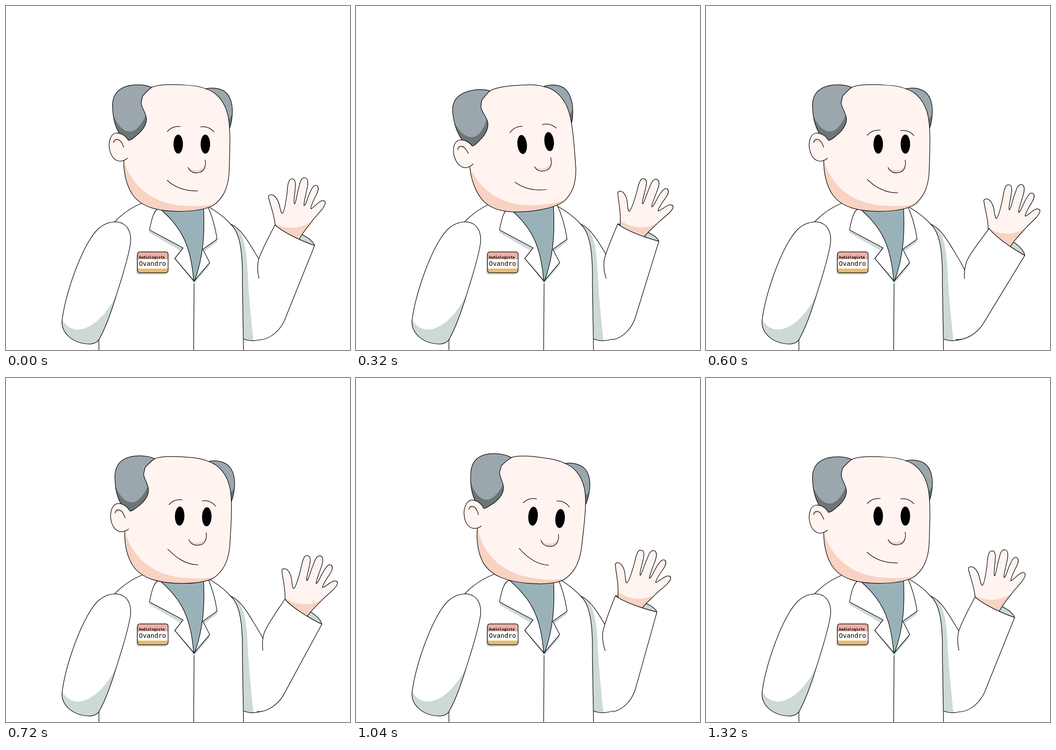
An HTML page that plays this animation: 748 px wide and 748 px high, repeating every 1400 ms.

```html
<!DOCTYPE html>
<html lang="pt">
<head>
<meta charset="utf-8">
<title>Waving audiologist</title>
<style>
  html, body { margin: 0; width: 100%; height: 100%; overflow: hidden; background: #fff; }
  svg { display: block; width: 100vw; height: 100vh; }
  .ln { fill: none; stroke: #000; stroke-width: 1.25; stroke-linecap: round; stroke-linejoin: round; }
  .white { fill: #fff; }
  .shade { fill: #cdd9d6; }
  .skin { fill: #fff4f0; }
  .blush { fill: #f8d2c2; }
  .grey { fill: #9ba6ad; }
  .dark { fill: #6c7678; }
  .teal { fill: #99b2b9; }
  text { font-family: "DejaVu Sans Mono", monospace; fill: #000; }
</style>
</head>
<body>
<svg viewBox="0 0 748 748">
  <defs>
    <path id="hairL" d="M317 177C300 169 268 169 250 180C235 189 230 205 232 225C233 245 238 263 246 277C251 285 258 292 264 292.500C272 293 280 284 288 278C300 267 307 255 305 242C302 228 294 220 294 210L297 196C304 188 310 182 317 177Z"/>
    <path id="hairR" d="M434 180C450 176 470 179 480 190C492 203 494 225 491 245C490 254 488 261 486 266L455 230Z"/>
    <path id="face" d="M317 177C330 171 360 170 390 172C415 173 425 176 434 180C459 187 477 210 483 240C485 252 486 258 486 266C488 290 486 340 485 365C482 400 470 420 450 434C430 444 400 446.500 376 446.500C330 446 295 438 275 410C262 390 256 365 256 336"/>
    <path id="hand" d="M590 505L585 476C584 455 575 435 571 417C569 410 577 409 582 412C590 418 594 428 596 440C598 447 599 451 601 451C605 448 608 430 611 408C612 395 613 376 621 376C629 375 630 385 629 395C628 410 625 425 627 430C630 432 633 405 638 390C640 378 645 373 650 373C658 375 657 388 654 400C651 415 647 428 648 434C652 434 656 415 662 403C667 393 670 389 675 390C681 393 679 402 675 410C670 420 662 435 663 441C668 440 675 430 682 426C688 421 695 423 694 429C692 440 675 455 666 467C658 478 645 492 636 510L630 530Z"/>
    <path id="sleeve" d="M236 469.500C262 469 275 490 270 520C264 556 247 606 239 632C228 668 216 700 204 722C200 731 192 735 180 735C148 734 119 713 122 683C126 652 136 615 150 577C164 540 180 505 200 485C212 474 223 470 236 469.500Z"/>
    <path id="lapels" d="M335 440C322 440 317 462 312 487L385 526L367 549L409 598L443 558L428 529L459 507C455 480 448 455 437 432"/>
    <path id="cuff" d="M550 592C547 580 546 567 549 552C556 530 570 505 585 476C600 490 635 508 671 521L605 685C595 706 575 724 553 726"/>
    <path id="ear" d="M266 292C260 282 250 275 238 276.500C228 279 223 293 224.500 307C227 326 236 337 248 337.500C254 337 260 335 264 331"/>
    <rect id="card" x="286" y="534.500" width="66.500" height="45.500" rx="5"/>
    <clipPath id="inHairL"><use href="#hairL"/></clipPath>
    <clipPath id="inHairR"><use href="#hairR"/></clipPath>
    <clipPath id="inFace"><use href="#face"/></clipPath>
    <clipPath id="inHand"><use href="#hand"/></clipPath>
    <clipPath id="inSleeve"><use href="#sleeve"/></clipPath>
    <clipPath id="inCard"><use href="#card"/></clipPath>
  </defs>

  <!-- coat -->
  <path class="shade" d="M488 474C511 480 522 512 525 570C527 620 532 670 538 728C530 729 522 727 517 724C515 680 515 640 514 600C515 535 509 492 488 474Z"/>
  <path class="ln" d="M432 432C458 446 476 460 488 474C509 492 515 535 514 600L516.500 748"/>
  <path class="ln" d="M488 474C512 483 530 518 549 549C555 559 560 568 564 578"/>
  <path class="ln" d="M517 724C528 729 548 731 575 717"/>
  <path class="ln" d="M236 469.500C252 453 272 437 300 427M202 725V748M409 598L408 748"/>

  <!-- collar -->
  <path class="shade" d="M312 487V493L381 533L386 526ZM367 549L409 604L442 565V558L409 598ZM459 507V513L431 534L428 529Z"/>
  <use href="#lapels" class="white"/>
  <path class="teal" d="M325 432C375 475 402 510 408 598H410C429 545 433 495 429 430"/>
  <path class="ln" d="M325 432C375 475 402 510 408 598H410C429 545 433 495 429 430"/>
  <use href="#lapels" class="ln"/>

  <!-- badge -->
  <use href="#card" class="shade" x="-3" y="4"/>
  <g clip-path="url(#inCard)">
    <path class="white" d="M286 534h67v46h-67z"/>
    <path fill="#eab0a7" d="M286 534h67v17h-67z"/>
    <path fill="#eab96f" d="M286 571h67v10h-67z"/>
  </g>
  <use href="#card" class="ln"/>
  <text x="289" y="548.500" font-size="7.750" font-weight="700">Audiologista</text>
  <text x="289" y="565" font-size="14">Ovandro</text>

  <!-- resting arm -->
  <use href="#sleeve" class="white"/>
  <path class="shade" clip-path="url(#inSleeve)" d="M120 677C140 722 196 712 240 629V740H120Z"/>
  <use href="#sleeve" class="ln"/>

  <!-- waving arm -->
  <g id="arm">
    <path class="ln" style="fill:#cdd9d6" d="M585 476C610 482 665 500 671 521C635 508 600 490 585 476Z"/>
    <g id="palm">
      <use href="#hand" class="skin"/>
      <path class="blush" clip-path="url(#inHand)" d="M580 470C610 489 645 486 672 462V535H580Z"/>
      <use href="#hand" class="ln"/>
    </g>
    <use href="#cuff" class="white"/>
    <use href="#cuff" class="ln"/>
  </g>

  <!-- head -->
  <g id="head">
    <use href="#hairR" class="grey"/>
    <path class="dark" clip-path="url(#inHairR)" d="M496 222C493 235 489 243 482 248V270H496Z"/>
    <use href="#hairR" class="ln"/>
    <path class="skin" d="M317 177L288 190L270 290L256 336L300 400L450 380L434 180Z"/>
    <use href="#face" class="skin"/>
    <path class="blush" clip-path="url(#inFace)" d="M255 330C270 392 320 430 385 434C412 436 435 436 458 429V450H250Z"/>
    <use href="#face" class="ln"/>
    <use href="#hairL" class="grey"/>
    <path class="dark" clip-path="url(#inHairL)" d="M231 233C243 262 256 273 270 273C286 272 298 252 306 232V296H231Z"/>
    <use href="#hairL" class="ln"/>
    <path class="skin" d="M266 292L275 310L264 331L240 310Z"/>
    <use href="#ear" class="skin"/>
    <use href="#ear" class="ln"/>
    <path class="blush" d="M234 297C236 287 247 287 253 300C246 293 240 292 234 297Z"/>
    <path class="ln" d="M234 297C236 287 247 287 253 300L256 307"/>
    <path class="blush" d="M396 351C404 359 422 360 433 348C431 356 428 360 422 361.500C410 365 400 361 396 351Z"/>
    <path class="ln" d="M433 335C435 345 433 358 422 361.500C410 365 400 361 396 351"/>
    <ellipse class="eye" cx="374.500" cy="300.300" rx="10.300"/>
    <ellipse class="eye" cx="433.500" cy="300.300" rx="10.300"/>
    <path id="brows" class="ln" d="M351 273C358 264 368 261 379 262M423 263C434 261 444 265 452 273.500"/>
    <path id="mouth" class="ln"/>
  </g>
</svg>
<script>
  const LOOP = 1400, STEP = 40, LAST = 1320;
  const $ = id => document.getElementById(id);
  const eyes = document.querySelectorAll('.eye');

  // [time, value] pairs, eased between neighbours
  const tracks = {
    head: [[0, 0], [250, -7], [560, 0], [600, 0], [960, 5.5], [1320, 0]],
    arm: [[0, 0], [340, -4.8], [600, 9.4], [1040, -6.3], [1320, 0]],
    palm: [[0, 0], [370, 14], [600, -4.8], [965, 16.3], [1320, 0]],
    eye: [[320, 20.7], [440, 2.5], [560, 20.7]],
    brow: [[240, 0], [440, -2.5], [600, 8], [800, 0]],
    mouthL: [[240, 379], [440, 382], [600, 377], [840, 368.6], [1320, 379]],
    mouthR: [[240, 402], [440, 405.5], [600, 406], [840, 404.2], [1320, 402]]
  };

  function at(name, t) {
    const keys = tracks[name];
    if (t <= keys[0][0]) return keys[0][1];
    for (let i = 1; i < keys.length; i++) {
      const [t0, a] = keys[i - 1], [t1, b] = keys[i];
      if (t <= t1) {
        const u = (t - t0) / (t1 - t0);
        return a + (b - a) * u * u * (3 - 2 * u);
      }
    }
    return keys[keys.length - 1][1];
  }

  const turn = (id, t, x, y) =>
    $(id).setAttribute('transform', `rotate(${at(id, t)} ${x} ${y})`);

  function draw(t) {
    turn('head', t, 376, 425);
    turn('arm', t, 552, 666);
    turn('palm', t, 607, 498);
    eyes.forEach(e => e.setAttribute('ry', at('eye', t)));
    $('brows').setAttribute('transform', `translate(0 ${at('brow', t)})`);
    const l = at('mouthL', t), r = at('mouthR', t);
    $('mouth').setAttribute('d', `M350.5 ${l}C365 ${l + 14} 388 ${r + 1} 417 ${r}`);
  }

  function tick() {
    const t = performance.now() % LOOP;
    draw(Math.min(LAST, Math.floor(t / STEP) * STEP));
    requestAnimationFrame(tick);
  }
  tick();
</script>
</body>
</html>
```
